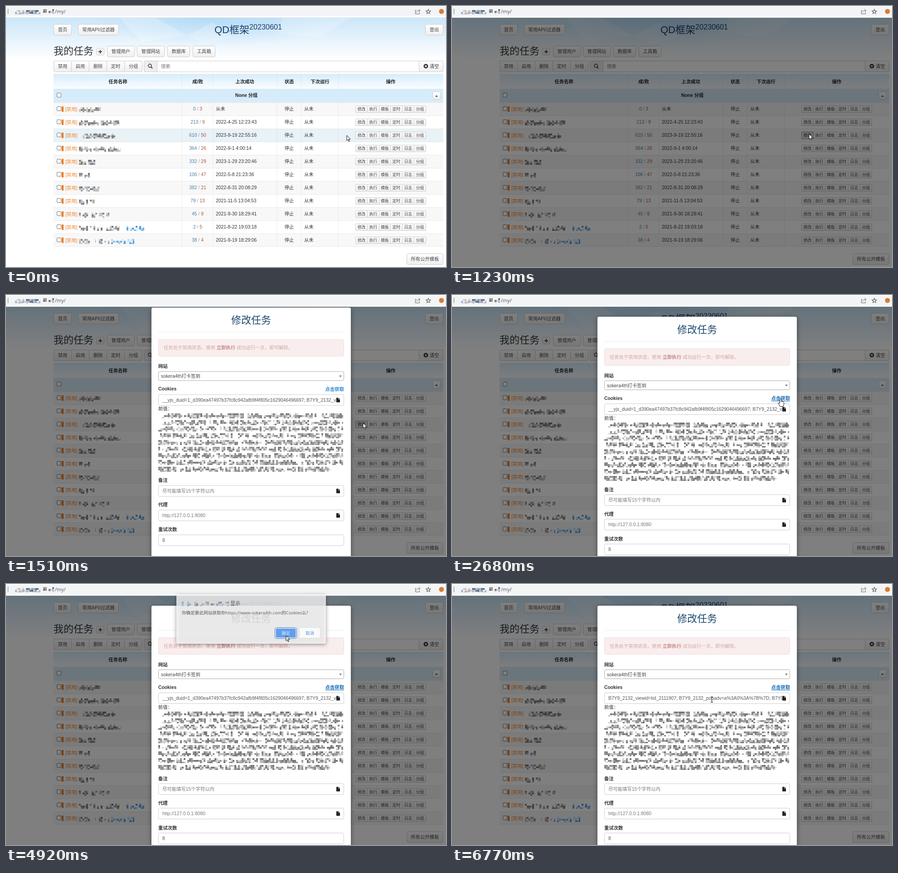
Write an HTML page with a canvas that moves like this. It is 971x577 px and loops after 6840 ms.

```html
<!DOCTYPE html>
<html lang="zh">
<head>
<meta charset="utf-8">
<title>QD框架</title>
<style>
html, body { margin: 0; width: 100%; height: 100%; overflow: hidden; background: #fff; }
canvas { display: block; }
</style>
</head>
<body>
<canvas id="stage" width="971" height="577"></canvas>
<script>
const W = 971, H = 577, LOOP = 6840, BAR = 26, BASE = 10.35;
const SANS = '"Liberation Sans", "Noto Sans CJK SC", "Noto Sans CJK", sans-serif';
const UI = '"Open Sans", "Noto Sans CJK SC", "Noto Sans CJK", sans-serif';
const SITE = 'sokera4th';
const c = document.getElementById('stage').getContext('2d');

const clamp = v => Math.max(0, Math.min(1, v));
const ramp = (t, from, to) => clamp((t - from) / (to - from));
const smooth = p => p * p * (3 - 2 * p);

// ---------- drawing helpers ----------
function text(s, x, mid, o = {}) {
  const size = o.size || BASE;
  c.font = `${o.bold ? 'bold ' : ''}${size}px ${o.font || SANS}`;
  c.textAlign = o.align || 'left';
  c.fillStyle = o.color || '#333';
  c.fillText(s, x, mid + size * 0.37);
  return c.measureText(s).width;
}

function rect(x, y, w, h, fill) {
  c.fillStyle = fill;
  c.fillRect(x, y, w, h);
}

function box(x0, y0, x1, y1, fill, line, r = 3) {
  c.beginPath();
  c.roundRect(x0 + 0.5, y0 + 0.5, x1 - x0 - 1, y1 - y0 - 1, r);
  if (fill) { c.fillStyle = fill; c.fill(); }
  if (line) { c.strokeStyle = line; c.lineWidth = 1; c.stroke(); }
}

function fade(y0, y1, from, to) {
  const g = c.createLinearGradient(0, y0, 0, y1);
  g.addColorStop(0, from);
  g.addColorStop(1, to);
  return g;
}

function button(label, x0, y0, x1, y1, o = {}) {
  const fill = o.hot ? '#e4e4e4' : fade(y0, y1, '#ffffff', '#efefef');
  box(x0, y0, x1, y1, fill, o.hot ? '#8c8c8c' : '#cccccc', o.r ?? 3);
  text(label, (x0 + x1) / 2, (y0 + y1) / 2, { align: 'center', size: o.size, color: o.color || '#444' });
}

function poly(fill, ...p) {
  c.beginPath();
  for (let i = 0; i < p.length; i += 2) c.lineTo(p[i], p[i + 1]);
  c.closePath();
  c.fillStyle = fill;
  c.fill();
}

function stroke(color, width, ...p) {
  c.beginPath();
  for (let i = 0; i < p.length; i += 2) c.lineTo(p[i], p[i + 1]);
  c.strokeStyle = color;
  c.lineWidth = width;
  c.stroke();
}

function disc(x, y, r, fill) {
  c.beginPath();
  c.arc(x, y, r, 0, 7);
  c.fillStyle = fill;
  c.fill();
}

const GRAY = ['#777777', '#9a9a9a', '#bcbcbc', '#d6d6d6', '#8a8a8a'];
const MIXED = ['#77777d', '#9b9b9b', '#c4c4c8', '#d9cdbb', '#a9bccf', '#8b8782'];
const BLUE = ['#4f97d8', '#8fc0ea', '#bcdcf5', '#6aa9e0', '#d3e9f9'];
const WARM = ['#6f7480', '#b5c7dc', '#8db9e0', '#e6c9b8', '#9a9a9a'];

// Blurred-out text: square cells, densest in the middle line
function mosaic(x0, x1, y0, y1, seed, colors, cell = 4) {
  let s = seed * 7919 + 17;
  const rnd = () => (s = s * 16807 % 2147483647) / 2147483647;
  rnd(); rnd();
  const mid = (y0 + y1 - cell) / 2;
  for (let x = x0; x < x1; x += cell) {
    const gap = rnd() < 0.1;
    for (let y = y0; y < y1; y += cell) {
      const fill = rnd() < (Math.abs(y - mid) < 2.5 ? 0.86 : 0.58);
      const color = colors[Math.floor(rnd() * colors.length)];
      if (fill && !gap) rect(x, y, Math.min(cell, x1 - x), Math.min(cell, y1 - y), color);
    }
  }
}

const checkbox = y => box(112, y - 5, 122, y + 5, '#fff', '#777', 1.5);

// ---------- page ----------
const ROWS = [
  [0, 3, '从未', 213], [213, 9, '2022-4-25 12:23:43', 250], [610, 50, '2023-9-19 22:55:16', 247],
  [364, 26, '2022-9-1 4:00:14', 254], [332, 29, '2023-1-29 23:20:46', 198], [106, 47, '2022-5-8 21:23:36', 186],
  [382, 21, '2022-8-31 20:08:29', 206], [79, 13, '2021-11-5 13:04:53', 195], [45, 9, '2021-9-30 18:29:41', 228],
  [2, 5, '2021-8-22 19:03:18', 250], [38, 4, '2021-9-19 18:29:06', 228]
];
const ACTIONS = ['修改', '执行', '模板', '定时', '日志', '分组'];
const COLUMNS = [389, 457, 598, 652, 734];

function header() {
  rect(0, 0, W, H, '#fff');
  rect(0, BAR, W, 92, fade(BAR, 118, '#cbe6f9', '#ffffff'));
  c.save();
  c.beginPath();
  c.rect(0, BAR, W, 90);
  c.clip();
  const g = c.createRadialGradient(450, BAR, 10, 450, BAR, 260);
  g.addColorStop(0, 'rgba(160,208,243,.5)');
  g.addColorStop(1, 'rgba(160,208,243,0)');
  c.setTransform(1, 0, 0, 0.25, 0, BAR * 0.75);
  rect(0, BAR, W, 360, g);
  c.setTransform(1, 0, 0, 1, 0, 0);
  poly('rgba(255,255,255,.22)', 250, 26, 330, 26, 400, 66, 300, 80);
  poly('rgba(255,255,255,.2)', 400, 66, 455, 36, 500, 70, 440, 84);
  poly('rgba(255,255,255,.18)', 610, 26, 760, 26, 690, 70, 600, 60);
  c.restore();

  button('首页', 105, 40, 145, 65);
  button('常用API/过滤器', 159, 40, 249, 65);
  button('登出', 925, 40, 965, 65);
  text('QD框架', 460, 52, { size: 22, color: '#1b3f6b' });
  text('20230601', 537, 46, { size: 16.2, color: '#1b3f6b' });

  text('我的任务', 105, 99, { size: 22 });
  button('', 199, 93, 217, 109);
  rect(204, 100, 8, 2, '#444');
  rect(207, 97, 2, 8, '#444');
  button('管理用户', 223, 88, 284, 113);
  button('管理网站', 289, 88, 350, 113);
  button('数据库', 356, 88, 406, 113);
  button('工具箱', 412, 88, 462, 113);

  ['禁用', '启用', '删除', '定时', '分组'].forEach((s, i) =>
    button(s, 105 + 39 * i, 121, 145 + 39 * i, 146, { r: 1 }));
  box(304, 121, 965, 146, '#fff', '#ccc');
  box(304, 121, 334, 146, '#eee', '#ccc');
  c.beginPath();
  c.arc(317.5, 132, 3.6, 0, 7);
  c.strokeStyle = '#444';
  c.lineWidth = 1.6;
  c.stroke();
  stroke('#444', 2, 320, 134.5, 323, 138);
  text('搜索', 342, 133, { color: '#777' });
  box(911, 121, 965, 146, fade(121, 146, '#fff', '#efefef'), '#ccc');
  disc(926.5, 133, 5, '#333');
  stroke('#fff', 1.4, 924.6, 131.1, 928.4, 134.9);
  stroke('#fff', 1.4, 928.4, 131.1, 924.6, 134.9);
  text('清空', 935, 133);
}

function row([ok, bad, last, end], i, hoverRow, hotButton) {
  const y = 213 + 29 * i, mid = y + 14;
  rect(105, y, 860, 29, hoverRow ? '#e8f2f7' : i % 2 ? '#ffffff' : '#f8f8f8');
  rect(105, y, 860, 1, '#e9e9e9');
  checkbox(mid);
  rect(123, mid - 5, 4, 12, '#f07a1a');
  text('[禁用]', 131, mid + 1.5, { color: '#f0842a' });
  const top = mid - 3 + (i > 5 ? 1 : 0);
  if (i === 10) {
    mosaic(161, 198, top, top + 11, 31, MIXED);
    mosaic(205, 228, top, top + 11, 32, MIXED);
    mosaic(232, 283, top, top + 11, 33, BLUE);
  } else {
    mosaic(161, end, top, top + 11, i + 3, MIXED);
    if (i === 9) mosaic(258, 305, top, top + 11, 41, BLUE);
  }
  c.font = `${BASE}px ${SANS}`;
  let x = 423 - c.measureText(`${ok} / ${bad}`).width / 2;
  x += text(`${ok}`, x, mid, { color: '#4a7cab' });
  x += text(' / ', x, mid, { color: '#999' });
  text(`${bad}`, x, mid, { color: '#ad5140' });
  text(last, 463, mid);
  text('停止', 625, mid, { align: 'center' });
  text('从未', 658, mid);
  ACTIONS.forEach((s, k) => {
    const l = Math.round(771 + 25.8 * k);
    button(s, l, mid - 7, Math.round(772 + 25.8 * (k + 1)), mid + 9, { size: 8.9, r: 1.5 });
  });
  if (hotButton) button('修改', 771, mid - 7, 798, mid + 9, { size: 8.9, r: 1.5, hot: true, color: '#222' });
}

function page(hoverRow, hotButton) {
  header();
  rect(105, 150, 860, 33, fade(150, 183, '#d6ecfb', '#fbfdff'));
  const heads = [['任务名称', 247], ['成/败', 423], ['上次成功', 527], ['状态', 625], ['下次运行', 693], ['操作', 849]];
  for (const [s, x] of heads) text(s, x, 167, { bold: true, align: 'center', color: '#222' });
  rect(105, 183, 860, 30, '#d7ecfa');
  checkbox(197);
  text('None 分组', 530.5, 197, { bold: true, align: 'center', color: '#222' });
  button('', 941, 189, 959, 207, { r: 2 });
  poly('#333', 947, 200.5, 950, 197.5, 953, 200.5);
  ROWS.forEach((r, i) => row(r, i, hoverRow && i === 2, hotButton && i === 2));
  for (const x of COLUMNS) {
    rect(x - 1, 150, 1, 33, 'rgba(0,0,0,.05)');
    rect(x - 1, 213, 1, 319, 'rgba(0,0,0,.06)');
  }
  rect(105, 531, 860, 1, '#e9e9e9');
  button('所有公开模板', 884, 547, 965, 572);
}

function addressBar() {
  rect(0, 0, W, BAR, '#fff');
  rect(0, 2, W, 20, '#f3f4f6');
  rect(0, 25, W, 1, '#e3e8ec');
  rect(4, 6, 1, 12, '#777');
  mosaic(12, 76, 9, 18, 5, WARM);
  mosaic(82, 107, 7, 17, 8, WARM);
  text('/my/', 108, 12, { size: 11, font: UI, color: '#555' });
  stroke('#666', 1, 906, 9.5, 903.5, 9.5, 903.5, 17.5, 912.5, 17.5, 912.5, 14);
  c.beginPath();
  c.moveTo(906, 14.5);
  c.quadraticCurveTo(907, 10, 913, 10);
  c.stroke();
  stroke('#666', 1, 910.5, 7, 914, 10, 910.5, 13);
  c.beginPath();
  for (let i = 0; i < 10; i++) {
    const a = -Math.PI / 2 + i * Math.PI / 5, r = i % 2 ? 2.3 : 5.3;
    c.lineTo(932 + r * Math.cos(a), 12.5 + r * Math.sin(a));
  }
  c.closePath();
  c.lineWidth = 1.1;
  c.strokeStyle = '#555';
  c.stroke();
  disc(961, 12, 5.5, '#d97d33');
}

// ---------- edit panel ----------
const COOKIE_OLD = '__yjs_duid=1_d390ea47497b37fc8c942afb9f4f805c1629046496697; B7Y9_2132_vi';
const COOKIE_NEW = 'B7Y9_2132_viewid=tid_2111907; B7Y9_2132_popadv=a%3A0%3A%7B%7D; B7Y9_';

function field(y0, y1, value, color, icon = true) {
  const mid = (y0 + y1) / 2;
  box(336, y0, 746, y1, '#fff', '#ccc');
  c.save();
  c.beginPath();
  c.rect(337, y0, 400, y1 - y0);
  c.clip();
  text(value, 345, mid, { color });
  c.restore();
  if (!icon) return;
  poly('#222', 729, mid - 5, 733.5, mid - 5, 733.5, mid - 1.5, 737, mid - 1.5, 737, mid + 5, 729, mid + 5);
  poly('#222', 734.3, mid - 5, 737, mid - 2.2, 734.3, mid - 2.2);
}

function panel(updated, linkHot) {
  c.save();
  c.shadowColor = 'rgba(0,0,0,.45)';
  c.shadowBlur = 11;
  c.shadowOffsetY = 3;
  c.beginPath();
  c.roundRect(321, 48, 440, 700, 4);
  c.fillStyle = '#fff';
  c.fill();
  c.restore();
  text('修改任务', 541, 75.5, { size: 22, color: '#1c476f', align: 'center' });
  rect(336, 102, 410, 1, '#ececec');
  box(336, 118, 746, 156, '#f9eeee', '#f0dcdc');
  const pink = '#d7a3a3';
  let x = 348;
  x += text('任务处于禁用状态，使用 ', x, 137, { color: pink });
  x += text('立即执行', x, 137, { color: '#c98b8b', bold: true });
  text(' 成功运行一次，即可解除。', x, 137, { color: pink });

  const label = (s, y) => text(s, 336, y, { bold: true });
  label('网站', 178);
  box(336, 189, 746, 210, '#fff', '#aaa');
  text(SITE + '打卡签到', 342, 200, { color: '#444' });
  poly('#888', 735, 198, 741, 198, 738, 202.5);
  label('Cookies', 228);
  const blue = linkHot ? '#0f68b8' : '#2f86cf';
  text('点击获取', 746, 228.5, { align: 'right', color: blue, bold: true });
  if (linkHot) rect(705, 234, 41, 1, blue);
  field(240, 265, updated ? COOKIE_NEW : COOKIE_OLD, '#555');
  text('前值：', 336, 272);
  for (let i = 0; i < 9; i++) {
    const y = Math.round(282 + 14.7 * i);
    mosaic(i < 2 ? 345 : 336, i === 8 ? 718 : 744, y, y + 11, 60 + i, GRAY);
  }
  label('备注', 430);
  field(441, 466, '尽可能填写15个字符以内', '#777');
  label('代理', 484);
  field(495, 520, 'http://127.0.0.1:8080', '#777');
  label('重试次数', 539);
  field(550, 575, '8', '#555', false);
}

// ---------- confirm dialog ----------
function confirmBox(hot) {
  c.save();
  c.shadowColor = 'rgba(0,0,0,.5)';
  c.shadowBlur = 8;
  c.shadowOffsetY = 2;
  c.beginPath();
  c.roundRect(376, 23, 330, 109, 4);
  c.fillStyle = '#fff';
  c.fill();
  c.restore();
  mosaic(388, 493, 39, 49, 14, WARM);
  text('显示', 495, 43, { size: 11, font: UI, color: '#222' });
  text(`你确定要此网站获取你https://www.${SITE}.com的Cookies么?`, 388, 63, { size: 9.65, font: UI });
  box(593, 96, 642, 121, '#fff', '#1a4fa8', 4);
  box(595, 98, 640, 119, hot ? '#3b86ea' : '#1a73e8', null, 2);
  text('确定', 617.5, 108.5, { size: 9.3, align: 'center', color: '#fff' });
  box(647, 96, 694, 120, '#fff', '#dadce0');
  text('取消', 670.5, 108.5, { size: 9.3, align: 'center', color: '#1a73e8' });
}

// ---------- pointer ----------
const ARROW = new Path2D('M0 0V11.6L2.6 9.2L4.5 13.6L6.3 12.8L4.4 8.5H8Z');
const HAND = new Path2D('M-1.6 1Q0-1 1.6 1V6L6.5 7.3Q7.6 8 7.6 10L7 14L5.8 17.5H-1.2L-2.2 15L-5 10.8Q-5.2 8.8-3.4 9.2L-1.6 11Z');
const PATH = [
  [0, 752, 286], [200, 752, 286], [830, 788, 283], [2200, 788, 283], [2680, 725, 229],
  [2930, 725, 229], [2940, 724, 228], [3940, 724, 228], [4060, 718, 241], [4630, 617, 114],
  [4770, 618, 114], [4900, 618, 114], [5600, 641, 258], [5780, 645, 280], [6040, 556, 260],
  [6200, 562, 243], [6350, 636, 249], [6590, 556, 253], [6760, 573, 255], [LOOP, 573, 255]
];

function pointerAt(t) {
  const i = PATH.findIndex((p, k) => k && t <= p[0]);
  const a = PATH[i - 1], b = PATH[i];
  const p = smooth(ramp(t, a[0], b[0]));
  return [a[1] + (b[1] - a[1]) * p, a[2] + (b[2] - a[2]) * p];
}

function pointer(t, x, y) {
  c.save();
  c.translate(Math.round(x), Math.round(y));
  if (t > 5000 && y > 238) {
    const beam = [[0.5, -5, 0.5, 6], [-2, -5.5, 3, -5.5], [-2, 6.5, 3, 6.5]];
    for (const l of beam) stroke('#111', 1, ...l);
  } else {
    const shape = t > 2560 && t < 4010 ? HAND : ARROW;
    c.fillStyle = '#fff';
    c.fill(shape);
    c.strokeStyle = '#111';
    c.lineWidth = 1;
    c.stroke(shape);
  }
  c.restore();
}

// ---------- timeline ----------
function draw(t) {
  const [x, y] = pointerAt(t);
  page(t < 1060, x > 771 && t < 1630);

  const dim = 0.5 * ramp(t, 1050, 1215);
  if (dim) rect(0, BAR, W, H - BAR, `rgba(0,0,0,${dim})`);

  const slide = ramp(t, 1340, 1640);
  if (slide) {
    c.save();
    c.globalAlpha = ramp(t, 1340, 1490);
    c.translate(0, -110 * (1 - slide) ** 2);
    panel(t >= 5060, t >= 2560);
    c.restore();
  }
  addressBar();

  const shown = ramp(t, 3060, 3230) * (1 - ramp(t, 4900, 5000));
  if (shown) {
    c.save();
    c.globalAlpha = shown;
    confirmBox(t > 4560);
    c.restore();
  }
  pointer(t, x, y);
}

function tick() {
  draw(performance.now() % LOOP);
  requestAnimationFrame(tick);
}
tick();
</script>
</body>
</html>
```
